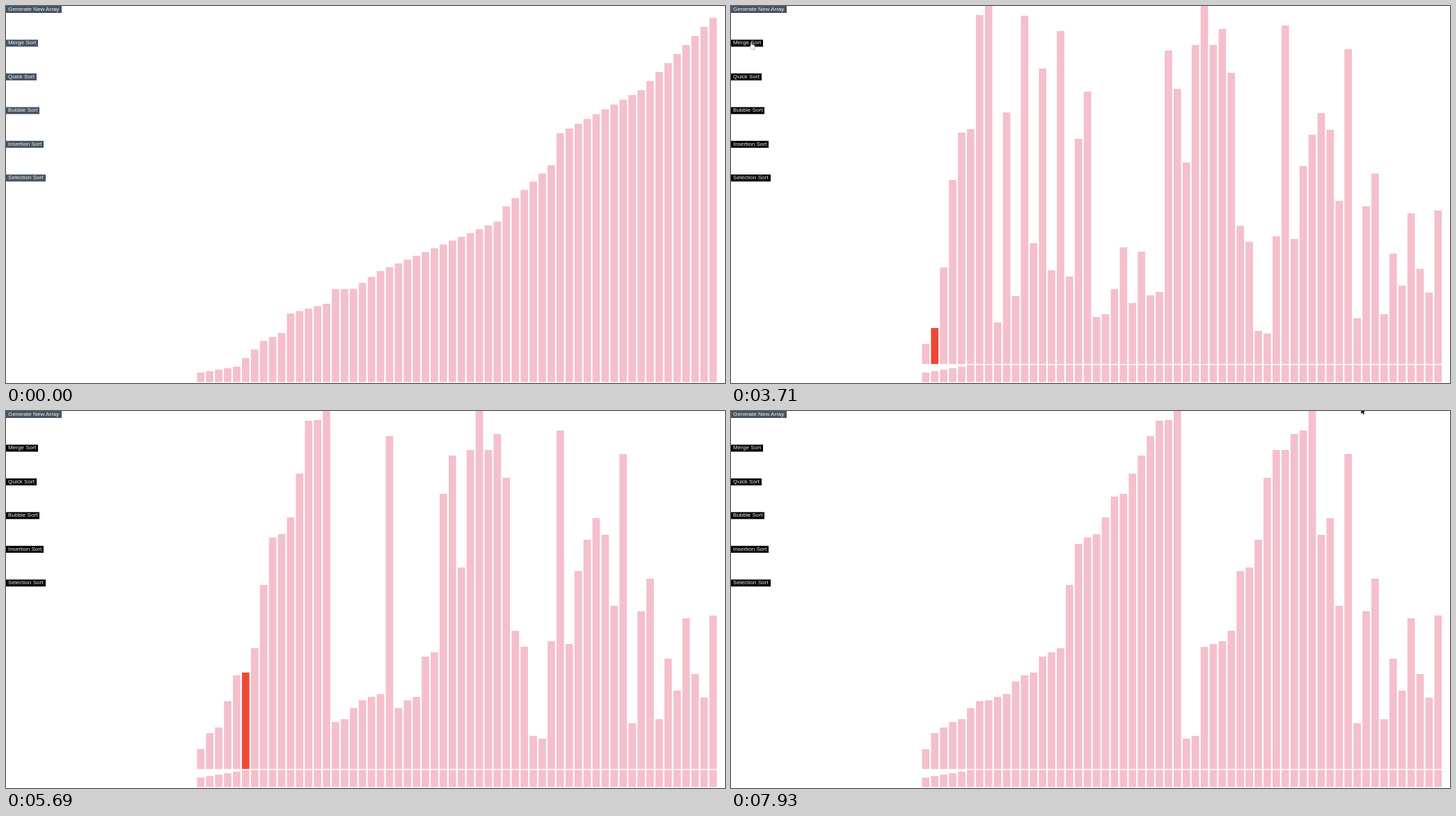
These frames come from a looping animation (1033x542 px, 8000 ms). An HTML page with a canvas:

```html
<!DOCTYPE html>
<html lang="en">
<head>
<meta charset="utf-8">
<title>Merge sort</title>
<style>
  html, body { margin: 0; width: 100%; height: 100%; overflow: hidden; background: #fff; }
  canvas { position: absolute; left: 0; top: 0; }
  .btn {
    position: absolute; left: 0; top: 0; height: 10.4px; padding: 0 3.1px;
    font: 8.1px/10.4px "Liberation Sans", Arial, sans-serif;
    white-space: nowrap; color: #f1f2f4; background: #475361;
  }
  .off .btn:not(:first-child) { background: #000; }
</style>
</head>
<body>
<div id="menu"></div>
<canvas id="stage" width="1033" height="542"></canvas>
<script>
const LOOP = 8000, COUNT = 58, LEFT = 274.4, PITCH = 12.914, BAR = 10.7;
const OLD_BASE = 540.7, BASE = 514.7, ROW_TOP = 516.2;
const PINK = '#f5bfcc', RED = '#ee4836';
const SHUFFLE = 210, RESHUFFLE = 1520, SORT = 3110, REFRESH = 94.5;

const menu = document.getElementById('menu');
['Generate New Array', 'Merge Sort', 'Quick Sort', 'Bubble Sort', 'Insertion Sort', 'Selection Sort']
  .forEach((label, i) => {
    const btn = document.createElement('div');
    btn.className = 'btn';
    btn.textContent = label;
    btn.style.transform = `translateY(${i * 48.46}px)`;
    menu.append(btn);
  });

// Piecewise linear curve through [x, y] points
function curve(points, x) {
  const k = Math.max(1, points.findIndex(p => p[0] >= x));
  const [x0, y0] = points[k - 1], [x1, y1] = points[k];
  return y0 + (y1 - y0) * (x - x0) / (x1 - x0);
}
const bars = topAt => Array.from({ length: COUNT }, (_, i) => topAt(i));

// Top edges: a finished array, a random one, and the one to be sorted
const slope = [
  [0, 527], [4, 518.5], [7, 481.5], [9, 470], [10, 442], [14, 428], [15, 407], [17, 406.5],
  [20, 381], [33, 310], [34, 288], [39, 229], [40, 183], [49, 121], [57, 17]
];
const sorted = bars(i => curve(slope, i));

let seed = 71;
const random = () => (seed = (seed * 16807) % 2147483647) / 2147483647;
const first = bars(() => 501 - random() * 508);

const mixed = [
  250, 182, 177, 376, 13, -4, 463, 486, 455, 153, 14, 417, 341, 90, 380, 36, 389, 191, 123, 447,
  443, 407, 347, 427, 353, 416, 411, 64, 119, 225, 56, -4, 56, 33, 96, 316, 339, 467, 471, 331,
  28, 335, 230, 185, 154, 178, 280, 62, 449, 288, 241, 443, 356, 402, 298, 378, 412, 294
];

// Each merge compares into a buffer, then writes it back
const ops = [];
function mergeSort(a, lo, hi) {
  if (lo >= hi) return;
  const mid = (lo + hi) >> 1, buffer = [];
  mergeSort(a, lo, mid);
  mergeSort(a, mid + 1, hi);
  let i = lo, j = mid + 1;
  while (i <= mid || j <= hi) {
    const both = i <= mid && j <= hi;
    ops.push({ red: both ? [i, j] : [] });
    const takeLeft = both ? a[i] >= a[j] : i <= mid;
    buffer.push(a[takeLeft ? i++ : j++]);
  }
  buffer.forEach((top, k) => {
    a[lo + k] = top;
    ops.push({ red: [k], at: lo + k, top });
  });
}
mergeSort(mixed.slice(), 0, COUNT - 1);

// Operations done after a number of screen refreshes
const pace = [[0, 2], [11, 100], [21, 169], [33, 265], [40, 323], [51, 407]];
const progress = t => Math.round(curve(pace, Math.floor((t - SORT) / REFRESH)));

// Pointer: time, shape, x, y
const moves = [
  [0], [210, 'hand', 60, 0], [760, 'arrow', 98, 8], [900, 'arrow', 79, 16],
  [1050, 'arrow', 72, 33], [1220, 'hand', 53, 4], [1820, 'arrow', 40, 33],
  [2000, 'hand', 26.5, 51.5], [4840], [6240, 'arrow', 111, 73], [6440, 'arrow', 905.3, -4]
];
const shapes = {
  arrow: { path: new Path2D('M0 0V8L1.9 6.3L3.2 9.2L4.6 8.6L3.3 5.8H5.6Z'), fill: '#000', line: '#fff' },
  hand: {
    path: new Path2D('M2 .7Q2.9 .1 3.2 1.2V4L6.6 4.6Q7.8 4.9 7.6 6.2L6.9 10.4H3L.6 7Q.1 6 1 5.8L2 6.4Z'),
    fill: '#fff', line: '#222'
  }
};

const ctx = document.getElementById('stage').getContext('2d');

function drawBars(tops, base, red = [], ceiling = 0) {
  tops.forEach((top, i) => {
    const y = Math.max(top, ceiling);
    ctx.fillStyle = red.includes(i) ? RED : PINK;
    ctx.fillRect(LEFT + i * PITCH, y, BAR, base - y);
  });
}

function drawPointer(t) {
  const [, name, x, y] = moves.filter(m => m[0] <= t).pop();
  if (!name) return;
  const { path, fill, line } = shapes[name];
  ctx.save();
  ctx.translate(x, y);
  ctx.lineWidth = 0.8;
  ctx.strokeStyle = line;
  ctx.fillStyle = fill;
  ctx.stroke(path);
  ctx.fill(path);
  ctx.restore();
}

function drawSort(t) {
  const now = progress(t), tops = mixed.slice();
  for (const op of ops.slice(0, now + 1)) if ('at' in op) tops[op.at] = op.top;
  drawBars(tops, BASE, ops[now].red);
}

function draw(t) {
  ctx.clearRect(0, 0, 1033, 542);
  menu.className = t >= SORT ? 'off' : '';
  // The foot of the finished array stays visible below the new one
  drawBars(sorted, OLD_BASE, [], t < SHUFFLE ? 0 : ROW_TOP);
  if (t >= SORT) drawSort(t);
  else if (t >= RESHUFFLE) drawBars(mixed, BASE);
  else if (t >= SHUFFLE) drawBars(first, BASE);
  drawPointer(t);
}

const start = performance.now();
function frame() {
  draw((performance.now() - start) % LOOP);
  requestAnimationFrame(frame);
}
frame();
</script>
</body>
</html>
```
